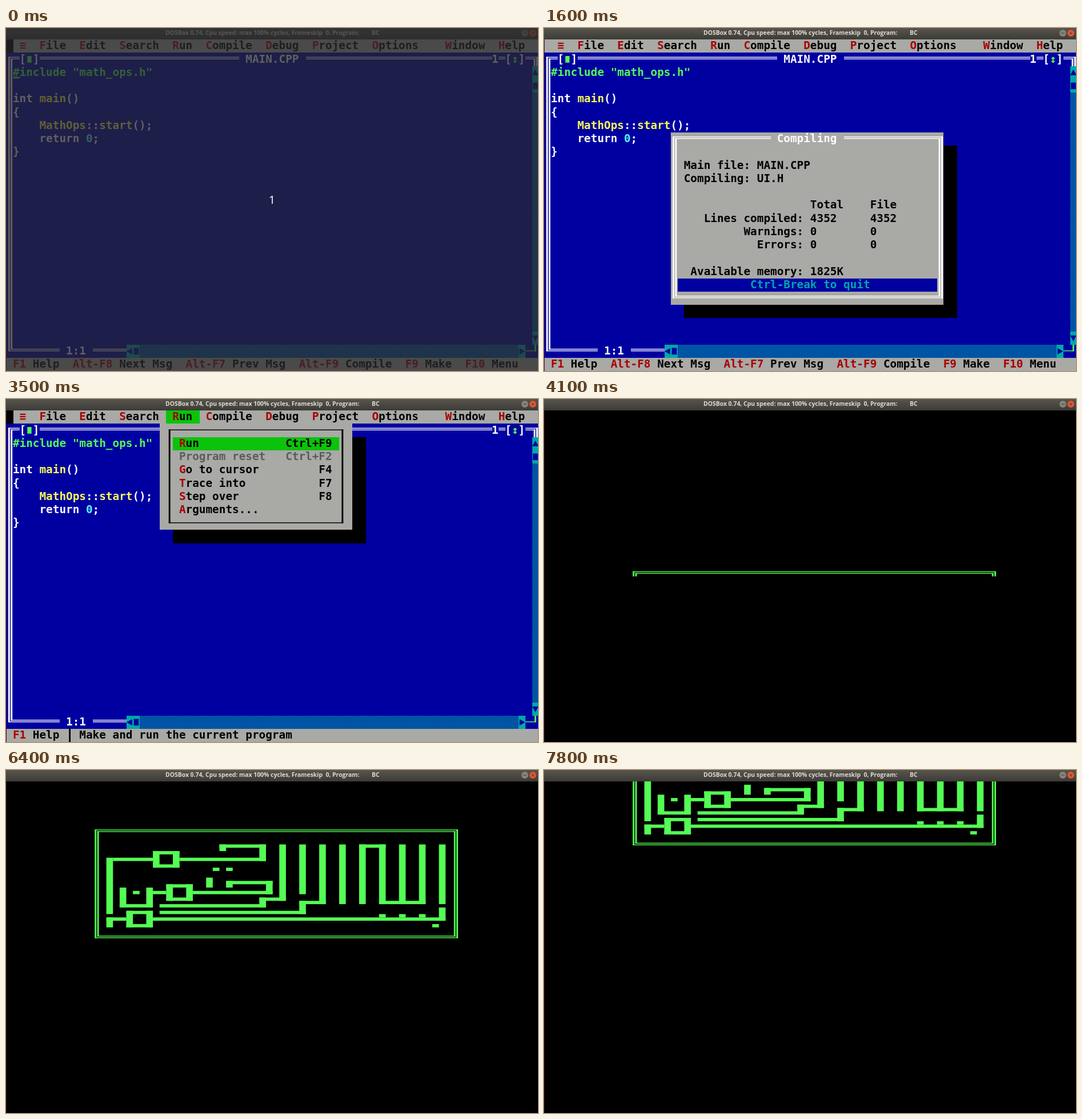
Write an HTML page with a canvas that moves like this. It is 931 px wide and 601 px high and loops after 8000 ms.

```html
<!DOCTYPE html>
<html lang="en">
<head>
<meta charset="utf-8">
<title>Compile and run</title>
<style>
html, body { margin: 0; width: 100%; height: 100%; overflow: hidden; background: #000; }
canvas { display: block; }
</style>
</head>
<body>
<canvas id="stage" width="931" height="601"></canvas>
<script>
const g = document.getElementById('stage').getContext('2d');
const W = 931, H = 601, TOP = 20;
const CW = 11.64, CH = 23.25, PX = CH / 16;
const BLUE = '#0000a1', GREY = '#a9a9a6', RED = '#a80000', TEAL = '#00a8a8',
  BAR = '#0bc30b', LIME = '#54fc54', YELLOW = '#fcfc54', CYAN = '#54fcfc',
  WHITE = '#fcfcfc', DIM = '#5c5c5c', BLACK = '#000';

const X = c => 1 + c * CW;
const Y = r => TOP + r * CH;

function rect(x, y, w, h, color) {
  g.fillStyle = color;
  g.fillRect(x, y, w, h);
}

// Whole character cells, snapped to pixels
function cells(c, r, w, h, color) {
  const x = Math.round(X(c)), y = Math.round(Y(r));
  rect(x, y, Math.round(X(c + w)) - x, Math.round(Y(r + h)) - y, color);
}

function put(c, r, text, color = BLACK, back) {
  if (back) cells(c, r, text.length, 1, back);
  g.font = 'bold 19.33px "DejaVu Sans Mono", monospace';
  g.fillStyle = color;
  [...text].forEach((ch, i) => g.fillText(ch, X(c + i) - PX / 2, Y(r) + 12 * PX));
}

// Text with a red hot key at its start
function hot(c, r, text, keyLength = 1) {
  put(c, r, text.slice(0, keyLength), RED);
  put(c + keyLength, r, text.slice(keyLength));
}

function ring(x0, y0, x1, y1, tx, ty, color) {
  rect(x0, y0, x1 - x0, ty, color);
  rect(x0, y1 - ty, x1 - x0, ty, color);
  rect(x0, y0, tx, y1 - y0, color);
  rect(x1 - tx, y0, tx, y1 - y0, color);
}

// Double frame; a and b are the pixel rows of its two lines inside a cell
function doubleFrame(c0, y0, c1, y1, a, b, color) {
  ring(X(c0) + 2 * PX, y0 + a * PX, X(c1) + 7 * PX, y1 + (b + 1) * PX, 2 * PX, PX, color);
  ring(X(c0) + 5 * PX, y0 + b * PX, X(c1) + 4 * PX, y1 + (a + 1) * PX, 2 * PX, PX, color);
}

function makeChecker() {
  const tile = document.createElement('canvas');
  tile.width = tile.height = 2;
  const t = tile.getContext('2d');
  t.fillStyle = BLUE;
  t.fillRect(0, 0, 2, 2);
  t.fillStyle = TEAL;
  t.fillRect(0, 0, 1, 1);
  t.fillRect(1, 1, 1, 1);
  const pattern = g.createPattern(tile, 'repeat');
  pattern.setTransform(new DOMMatrix([PX, 0, 0, PX, 1, TOP]));
  return pattern;
}
const checker = makeChecker();

function arrow(c, r, angle) {
  cells(c, r, 1, 1, TEAL);
  g.save();
  g.translate(X(c + .5), Y(r + .5));
  g.rotate(angle * Math.PI / 2);
  g.fillStyle = BLUE;
  g.beginPath();
  g.moveTo(0, -5.5);
  g.lineTo(5.5, 4.5);
  g.lineTo(-5.5, 4.5);
  g.fill();
  g.restore();
}

function thumb(c, r) {
  cells(c, r, 1, 1, TEAL);
  rect(X(c) + PX, Y(r) + 4 * PX, 6 * PX, 8 * PX, BLUE);
}

function titleBar() {
  const shade = g.createLinearGradient(0, 0, 0, TOP);
  shade.addColorStop(0, '#57554c');
  shade.addColorStop(1, '#3c3b37');
  rect(0, 0, W, TOP, shade);
  g.font = 'bold 10.4px "Open Sans", "Noto Sans", sans-serif';
  g.fillStyle = '#dfdbd2';
  g.fillText('DOSBox 0.74, Cpu speed: max 100% cycles, Frameskip \u00a00, Program:', 279, 12);
  g.fillText('BC', 640, 12);
  [[908, '#85837a'], [922, '#e2542f']].forEach(([x, color]) => {
    g.fillStyle = color;
    g.beginPath();
    g.arc(x, 9, 6, 0, 7);
    g.fill();
  });
  g.strokeStyle = '#45433e';
  g.lineWidth = 1;
  g.beginPath();
  g.moveTo(905, 9); g.lineTo(911, 9);
  g.moveTo(920, 7); g.lineTo(924, 11);
  g.moveTo(924, 7); g.lineTo(920, 11);
  g.stroke();
  rect(0, TOP, 1, H - TOP, '#3a0b26');
}

function scrollBars() {
  cells(79, 2, 1, 21, checker);
  arrow(79, 2, 0);
  thumb(79, 3);
  arrow(79, 22, 2);
  cells(18, 23, 60, 1, checker);
  arrow(18, 23, 3);
  thumb(19, 23);
  arrow(77, 23, 1);
  cells(78, 23, 2, 1, BLUE);
  rect(X(78), Y(23) + 7 * PX, CW + 5 * PX, PX, LIME);
  rect(X(79) + 3 * PX, Y(23), 2 * PX, 8 * PX, LIME);
}

function statusBar(hint) {
  cells(0, 24, 80, 1, GREY);
  hot(1, 24, 'F1 Help', 2);
  if (hint) {
    rect(X(9) + 3 * PX, Y(24), 2 * PX, CH, BLACK);
    put(11, 24, hint);
    return;
  }
  hot(10, 24, 'Alt-F8 Next Msg', 6);
  hot(27, 24, 'Alt-F7 Prev Msg', 6);
  hot(44, 24, 'Alt-F9 Compile', 6);
  hot(60, 24, 'F9 Make', 2);
  hot(69, 24, 'F10 Menu', 3);
}

const menuBar = { File: 5, Edit: 11, Search: 17, Run: 25, Compile: 30, Debug: 39,
  Project: 46, Options: 55, Window: 66, Help: 74 };

function editor(n, hint) {
  cells(0, 0, 80, 1, GREY);
  put(2, 0, '≡', RED);
  for (const name in menuBar) hot(menuBar[name], 0, name);
  if (n < 10 || n >= 26) cells(0, 0, 1, 1, BLACK);

  cells(0, 1, 80, 23, BLUE);
  doubleFrame(0, Y(1), 79, Y(23), 5, 7, WHITE);
  put(2, 1, '[ ]', WHITE, BLUE);
  rect(X(3) + PX, Y(1) + 4 * PX, 5 * PX, 8 * PX, LIME);
  put(35, 1, ' MAIN.CPP ', WHITE, BLUE);
  put(73, 1, '1', WHITE, BLUE);
  put(75, 1, '[ ]', WHITE, BLUE);
  put(76, 1, '↕', LIME);
  put(8, 23, ' 1:1 ', WHITE, BLUE);
  scrollBars();

  put(1, 2, '#include "math_ops.h"', LIME);
  put(1, 4, 'int     ()', WHITE);
  put(5, 4, 'main', YELLOW);
  put(1, 5, '{', WHITE);
  put(5, 6, 'MathOps  start', YELLOW);
  put(12, 6, '::     ();', WHITE);
  put(5, 7, 'return  ;', WHITE);
  put(12, 7, '0', CYAN);
  put(1, 8, '}', WHITE);
  if (n < 9) rect(X(1), Y(2) + 13 * PX, CW, 2 * PX, LIME);
  statusBar(hint);
}

function panel(c, r, w, h) {
  cells(c + 2, r + 1, w, h, BLACK);
  cells(c, r, w, h, GREY);
}

function menu(name, width, items) {
  const c = menuBar[name] - 2, bottom = items.length + 2;
  cells(c + 1, 0, name.length + 2, 1, BAR);
  hot(c + 2, 0, name);
  panel(c, 1, width, bottom);
  ring(X(c + 1) + 3 * PX, Y(1) + 7 * PX, X(c + width - 2) + 5 * PX,
    Y(bottom) + 8 * PX, 2 * PX, PX, BLACK);
  items.forEach(([label, keys = '', off], i) => {
    const r = i + 2;
    if (!label) return rect(X(c + 1) + 3 * PX, Y(r) + 7 * PX, (width - 3) * CW, PX, BLACK);
    if (!i) cells(c + 2, r, width - 4, 1, BAR);
    if (off) put(c + 3, r, label, DIM); else hot(c + 3, r, label);
    put(c + width - 3 - keys.length, r, keys, off ? DIM : BLACK);
  });
}

const compileItems = [['Compile', 'Alt+F9'], ['Make', 'F9'], ['Link'], ['Build all'],
  [''], ['Information...'], ['Remove messages']];
const runItems = [['Run', 'Ctrl+F9'], ['Program reset', 'Ctrl+F2', true], ['Go to cursor', 'F4'],
  ['Trace into', 'F7'], ['Step over', 'F8'], ['Arguments...']];
const files = ['MAIN.CPP', 'IOSTREAM.H', 'CONIO.H', 'STDLIB.H', 'DOS.H', 'GRAPHICS.H', 'UI.H', 'UI.H'];

function compiling(n) {
  const done = n >= 26;
  const lines = String(n <= 16 ? Math.round(4352 * (n - 10) / 6) : 4352 + 173 * (Math.min(n, 26) - 16));
  panel(19, 7, 41, 13);
  doubleFrame(19, Y(7), 59, Y(19), 5, 7, WHITE);
  put(34, 7, ' Compiling ', WHITE, GREY);
  put(21, 9, 'Main file: MAIN.CPP');
  put(21, 10, 'Compiling: ' + (files[n - 10] || 'MAIN.CPP'));
  put(40, 12, 'Total    File');
  [['Lines compiled:', lines], ['Warnings:', '0'], ['Errors:', '0']].forEach(([label, value], i) => {
    put(39 - label.length, 13 + i, label);
    put(40, 13 + i, value);
    put(49, 13 + i, value);
  });
  put(22, 17, 'Available memory: 1825K');
  cells(20, 18, 39, 1, BLUE);
  if (!done) return put(31, 18, 'Ctrl-Break to quit', TEAL);
  put(23, 18, 'Compile successful:', TEAL);
  if (n < 29 || n >= 31) put(43, 18, 'Press any key', TEAL);
}

// Maze strokes: columns from the frame, heights in half rows
const uprights = [[2, 9, 26], [19, 5, 7], [25, 5, 10], [17, 15, 18], [20, 16, 18], [26, 16, 20],
  [4, 18, 24], [8, 18, 24], [25, 21, 24], [31, 22, 26], [52, 24, 28], [2, 27, 30]];
const levels = [[3, 9, 9], [13, 26, 9], [19, 26, 5], [18, 19, 12], [20, 21, 12], [20, 27, 16],
  [15, 27, 19], [9, 11, 19], [6, 7, 19], [4, 9, 23], [10, 26, 23], [25, 29, 21], [10, 32, 25],
  [31, 35, 22], [40, 44, 5], [43, 50, 22], [2, 5, 27], [9, 53, 27], [51, 52, 29]];
const rooms = [[9, 7], [11, 17], [5, 25]];

function maze(top, rows) {
  const rowH = CH / 2, half = CH / 4, y = TOP + top * rowH;
  const block = (c, k, w, h) => rect(X(13 + c), y + k * half, w * CW, h * half, LIME);
  g.save();
  g.beginPath();
  g.rect(0, TOP, W, Math.max(0, y + rows * rowH - TOP));
  g.clip();
  doubleFrame(13, y, 67, y + 16 * rowH, 2, 4, LIME);
  uprights.forEach(([c, k0, k1]) => block(c, k0, 1, k1 - k0));
  levels.forEach(([c0, c1, k]) => block(c0, k, c1 - c0, 1));
  for (let c = 28; c <= 52; c += 3) block(c, 5, 1, c === 28 ? 17 : c === 31 ? 15 : 18);
  for (let c = 43; c <= 49; c += 3) block(c, 26, 1, 1);
  rooms.forEach(([c, k]) => ring(X(13 + c), y + k * half, X(17 + c), y + (k + 5) * half, CW, half, LIME));
  g.restore();
}

function program(n) {
  if (n < 41) return;
  if (n === 41) return maze(24, 1);
  const rows = n < 44 ? 2 : Math.min(17, n - 40);
  maze(12 - Math.min(19, Math.max(0, n - 59)), rows);
}

function fadeIn(n) {
  const left = 1 - n / 5;
  if (left <= 0) return;
  rect(0, 0, W, H, `rgba(41,41,44,${.74 * left})`);
  g.font = '20px "Noto Sans", sans-serif';
  g.fillStyle = `rgba(245,245,245,${left})`;
  g.textAlign = 'center';
  g.fillText('1', W / 2, 308);
  g.textAlign = 'left';
}

function draw(now) {
  const n = Math.floor(now % 8000 / 100);
  rect(0, 0, W, H, BLACK);
  if (n < 40) {
    const compileMenu = n === 9, runMenu = n >= 35 && n < 39;
    editor(n, compileMenu ? 'Compile the current file' : runMenu ? 'Make and run the current program' : '');
    if (compileMenu) menu('Compile', 27, compileItems);
    if (runMenu) menu('Run', 29, runItems);
    if (n >= 10 && n < 33) compiling(n);
  } else {
    program(n);
  }
  titleBar();
  fadeIn(n);
  requestAnimationFrame(draw);
}
requestAnimationFrame(draw);
</script>
</body>
</html>
```
